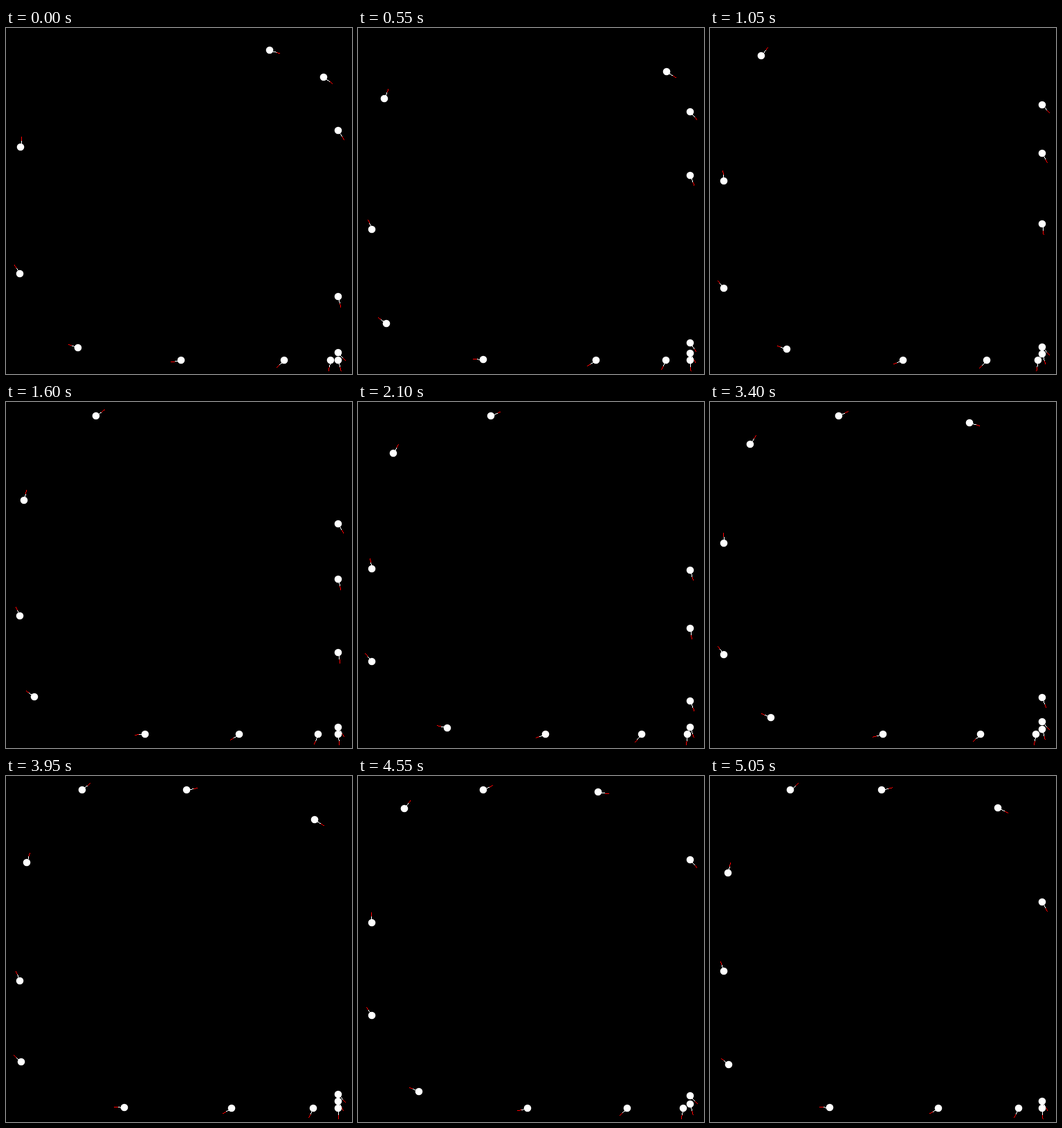
These frames come from a looping animation (500 by 500 pixels, 5.1 s). An HTML page with a canvas:

```html
<!DOCTYPE html>
<html lang="en">
<head>
<meta charset="utf-8">
<title>Circling agents</title>
<style>
html, body { margin: 0; width: 100%; height: 100%; overflow: hidden; background: #000; }
canvas { display: block; width: 500px; height: 500px; }
</style>
</head>
<body>
<canvas id="stage" width="500" height="500"></canvas>
<script>
const ctx = document.getElementById('stage').getContext('2d');
const LOOP = 5100, STEP = 50, FRAMES = 101;
const MIN = 20, MAX = 480, MID = 250, SIZE = 10;
const SPEED = 7.22, TURN = 0.115;
const FIRST_OUT = 6, RELEASE_GAP = 22.5;

const clamp = v => Math.min(MAX, Math.max(MIN, v));
const cos = deg => Math.cos(deg * Math.PI / 180);
const sin = deg => Math.sin(deg * Math.PI / 180);

// Direction of the clockwise circle around the centre
const tangent = p => Math.atan2(p.x - MID, MID - p.y) * 180 / Math.PI;

// Frames since the agent's turn to leave the bottom right corner
const sinceRelease = (i, frame) => frame - RELEASE_GAP * (FIRST_OUT - i);

const nearCorner = (p, wait) => wait < 10 && p.x > 440 && p.y >= 290;

// Agents veer outward on the way down, then turn evenly while they wait
function cornerHeading(p, wait) {
  if (p.y < 460) return 84 - 36 * Math.exp((p.y - 460) / 40);
  return Math.max(48, 103 + 1.2 * wait);
}

// Lowest place in the corner that does not overlap the agent ahead
function floorFor(ahead) {
  const dx = MAX - ahead.x;
  return dx < SIZE ? ahead.y - Math.sqrt(SIZE * SIZE - dx * dx) : MAX;
}

function move(p, heading, floor = MAX) {
  const x = clamp(p.x + SPEED * cos(heading));
  const y = Math.min(clamp(p.y + SPEED * sin(heading)), Math.max(p.y, floor));
  return { x, y, heading };
}

function advance(p, i, all, frame) {
  const wait = sinceRelease(i, frame);
  if (nearCorner(p, wait)) {
    return move(p, cornerHeading(p, wait), floorFor(all[(i + 1) % all.length]));
  }
  const diff = ((tangent(p) - p.heading + 540) % 360 + 360) % 360 - 180;
  return move(p, p.heading + diff * TURN);
}

function startPose([x, y], i) {
  const p = { x, y }, wait = sinceRelease(i, 0);
  const onWall = [x, y].some(v => v === MIN || v === MAX);
  p.heading = nearCorner(p, wait) ? cornerHeading(p, wait) : tangent(p) - (onWall ? 8 : 14);
  return p;
}

const starts = [
  [381, 32], [459, 71], [480, 148], [480, 388], [480, 469], [480, 480],
  [469, 480], [402, 480], [253, 480], [104, 462], [20, 355], [21, 172]
];
const poses = [starts.map(startPose)];
for (let f = 1; f < FRAMES; f++) {
  poses.push(poses[f - 1].map((p, i, all) => advance(p, i, all, f)));
}

function drawAgent(p) {
  const x = Math.round(p.x), y = Math.round(p.y);
  const dx = cos(p.heading), dy = sin(p.heading);
  const stride = 1 / Math.max(Math.abs(dx), Math.abs(dy));
  for (let d = 0; d <= 15.5; d += stride) {
    ctx.fillStyle = d < 10 ? '#fff' : '#f00';
    ctx.fillRect(Math.round(x + dx * d), Math.round(y + dy * d), 1, 1);
  }
  ctx.fillStyle = '#fff';
  ctx.beginPath();
  ctx.arc(x, y, 5.3, 0, Math.PI * 2);
  ctx.fill();
}

function draw() {
  const t = performance.now() % LOOP;
  const frame = Math.max(0, Math.floor(t / STEP) - 1);
  ctx.fillStyle = '#000';
  ctx.fillRect(0, 0, 500, 500);
  poses[frame].forEach(drawAgent);
  requestAnimationFrame(draw);
}
draw();
</script>
</body>
</html>
```
